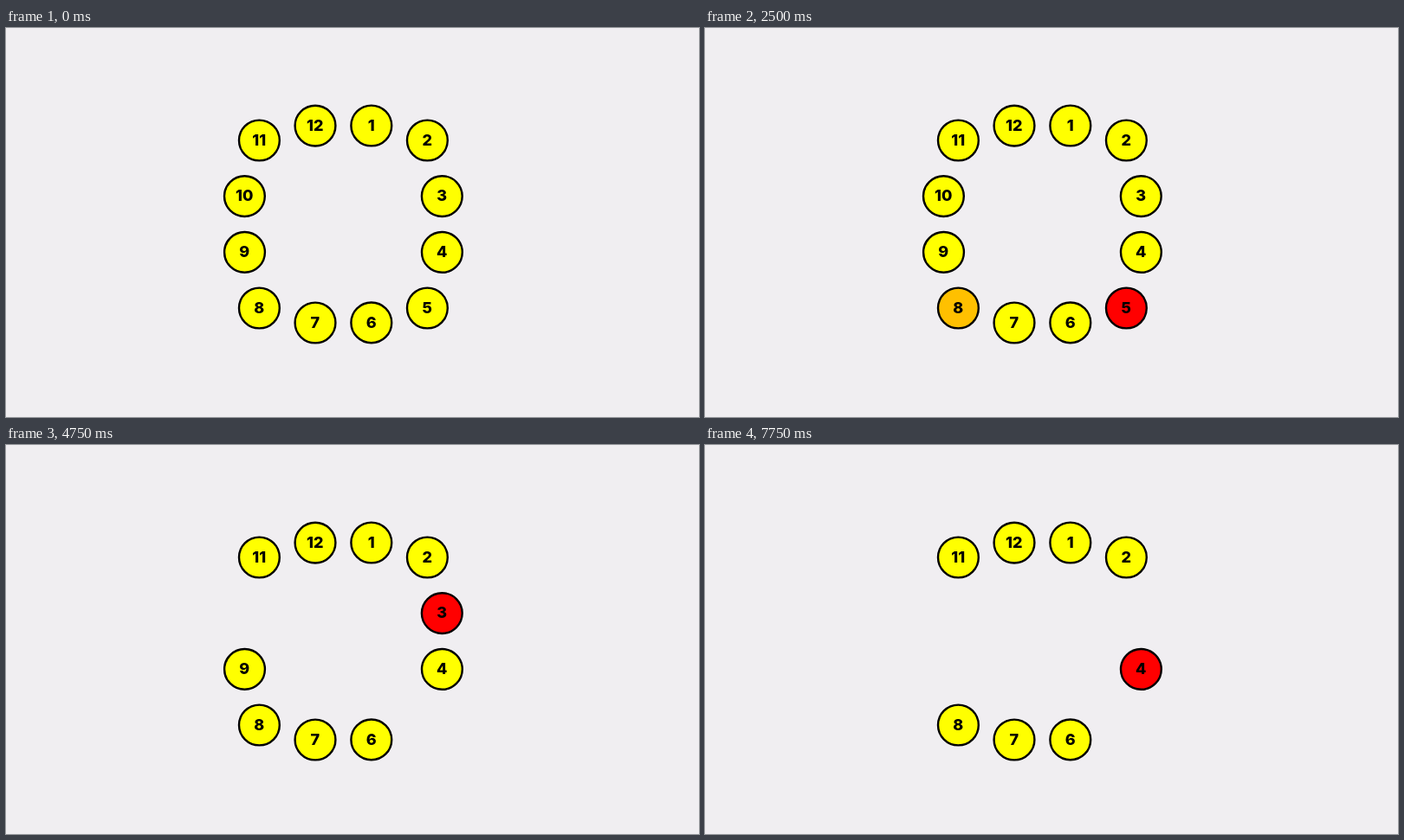
Recreate the animation shown at these times as an HTML page. Size 800x450 px, loop 8000 ms.

```html
<!DOCTYPE html>
<html lang="en">
<head>
<meta charset="utf-8">
<title>Counting circle</title>
<style>
  html, body { margin: 0; width: 100%; height: 100%; overflow: hidden; background: #f0eef1; }
  svg { display: block; width: 800px; height: 450px; }
  circle { stroke: #000; stroke-width: 2.4; }
  text { font: 800 18px Inter, Roboto, sans-serif; text-anchor: middle; fill: #000; }
</style>
</head>
<body>
<svg id="stage" viewBox="0 0 800 450"></svg>
<script>
  const LOOP = 8000, STEP = 250, COUNT = 12, SKIP = 5;
  const CX = 389.4, CY = 227;
  const YELLOW = '#ffff00', ORANGE = '#ffc000', RED = '#ff0000';
  // Offsets of 1, 2 and 3; each further group of three is a quarter turn on.
  const QUARTER = [[32.4, -114], [97, -97], [113.9, -32.4]];
  const stage = document.getElementById('stage');

  function add(parent, tag, attrs) {
    const el = document.createElementNS('http://www.w3.org/2000/svg', tag);
    for (const key in attrs) el.setAttribute(key, attrs[key]);
    return parent.appendChild(el);
  }

  const discs = Array.from({ length: COUNT }, (_, i) => {
    let [x, y] = QUARTER[i % 3];
    for (let q = Math.floor(i / 3); q > 0; q--) [x, y] = [-y, x];
    const group = add(stage, 'g', { transform: `translate(${CX + x} ${CY + y})` });
    const circle = add(group, 'circle', { r: 23.4, fill: YELLOW });
    add(group, 'text', { x: -0.2, y: 5.7 }).textContent = i + 1;
    return { group, circle };
  });

  // Every fifth disc turns red, staying until the next one is struck out.
  function buildSteps() {
    const idle = { active: -1, red: -1, gone: [] };
    const steps = [idle, idle];
    const out = [];
    let pos = -1, red = -1, gone = [];
    while (steps.length < LOOP / STEP) {
      for (let n = 0; n < SKIP; n++) {
        do pos = (pos + 1) % COUNT; while (out.includes(pos));
        steps.push({ active: pos, red, gone });
      }
      gone = out.slice();
      out.push(pos);
      red = pos;
      steps.push({ active: -1, red, gone });
    }
    return steps;
  }

  const steps = buildSteps();
  let shown = -1;

  function show(index) {
    if (index === shown) return;
    shown = index;
    const { active, red, gone } = steps[index];
    discs.forEach(({ group, circle }, i) => {
      group.setAttribute('visibility', gone.includes(i) ? 'hidden' : 'visible');
      circle.setAttribute('fill', i === active ? ORANGE : i === red ? RED : YELLOW);
    });
  }

  let start;
  function tick(now) {
    start ??= now;
    show(Math.floor(((now - start) % LOOP) / STEP));
    requestAnimationFrame(tick);
  }
  show(0);
  requestAnimationFrame(tick);
</script>
</body>
</html>
```
